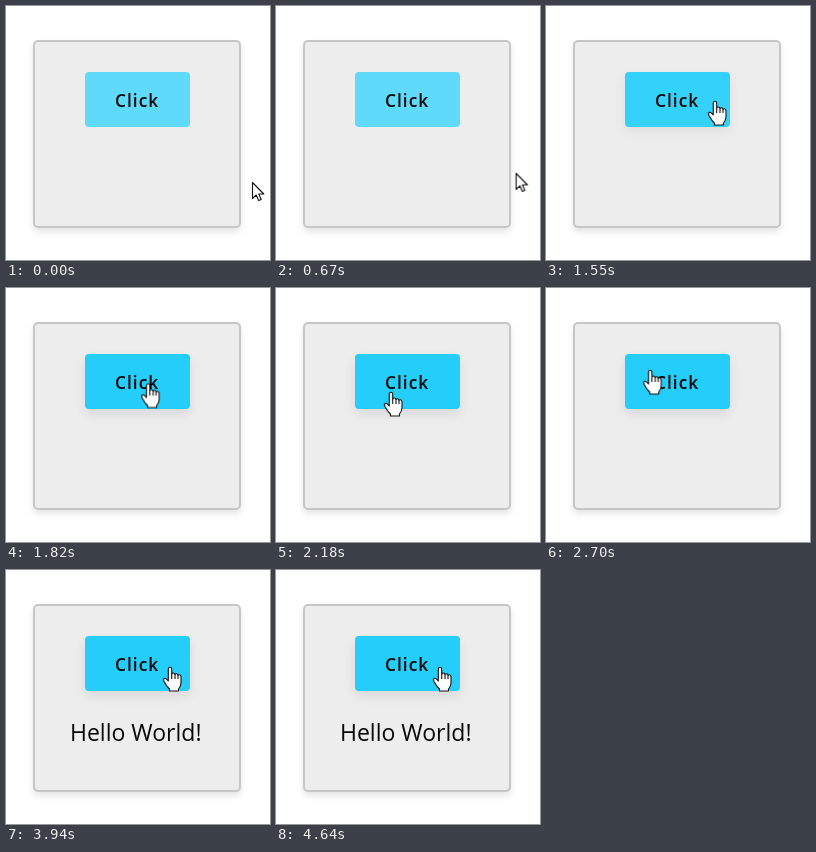
These frames come from a looping animation (264 px wide and 254 px high, 6240 ms). An HTML page:

```html
<!DOCTYPE html>
<html lang="en">
<head>
<meta charset="utf-8">
<title>Click button</title>
<style>
  :root { --loop: 6240ms; }
  html, body { margin: 0; width: 100%; height: 100%; overflow: hidden; background: #fff; }
  .stage { position: relative; width: 264px; height: 254px; overflow: hidden; }
  .stage > * { position: absolute; }

  .card {
    left: 27px; top: 34px; width: 208px; height: 188px; box-sizing: border-box;
    background: #ededed; border: 2px solid #c6c6c6; border-radius: 5px;
    box-shadow: 0 4px 6px rgba(0, 0, 0, .1);
  }
  .button {
    left: 79px; top: 66px; width: 105px; height: 55px; border-radius: 4px;
    background: #5fdafb;
    animation: hover var(--loop) infinite;
  }
  svg { left: 0; top: 0; overflow: visible; }
  text { font-family: "Open Sans", "Noto Sans", sans-serif; fill: #080808; }
  .label { font-size: 17.4px; font-weight: 600; letter-spacing: 1px; }
  .hello { font-size: 23px; animation: reveal var(--loop) step-end infinite; }

  .cursor { animation: move var(--loop) linear infinite; }
  .cursor path { fill: #fff; stroke: #111; stroke-width: 1.1; stroke-linejoin: round; }
  .arrow { animation: arrow var(--loop) step-end infinite; }
  .hand { animation: hand var(--loop) step-end infinite; }

  @keyframes hover {
    0%, 22.44% {
      background: #5fdafb; box-shadow: 0 5px 12px rgba(0, 0, 0, 0);
      animation-timing-function: ease;
    }
    28%, 100% { background: #24cdfa; box-shadow: 0 5px 12px rgba(0, 0, 0, .09); }
  }
  @keyframes reveal { 0% { opacity: 0; } 60.1%, 100% { opacity: 1; } }
  @keyframes arrow { 0% { opacity: 1; } 22.44%, 100% { opacity: 0; } }
  @keyframes hand { 0% { opacity: 0; } 22.44%, 100% { opacity: 1; } }
  @keyframes move {
    0%, 5.77% { transform: translate(246px, 176px); }
    11.22% { transform: translate(239px, 166px); }
    15.54% { transform: translate(228px, 153px); }
    17.47% { transform: translate(216px, 143px); }
    20.99% { transform: translate(193px, 120px); }
    24.84% { transform: translate(169px, 95px); }
    28.85% { transform: translate(144px, 95px); }
    32.05% { transform: translate(126px, 100px); }
    34.94% { transform: translate(115px, 104px); }
    38.14% { transform: translate(94px, 95px); }
    40.38% { transform: translate(90px, 80px); }
    43.27% { transform: translate(104px, 82px); }
    46.15% { transform: translate(146px, 93px); }
    49.68% { transform: translate(160px, 97px); }
    52.88%, 100% { transform: translate(164px, 97px); }
  }
</style>
</head>
<body>
<div class="stage">
  <div class="card"></div>
  <div class="button"></div>
  <svg width="264" height="254">
    <text class="label" x="109" y="101">Click</text>
    <text class="hello" x="64" y="171">Hello World!</text>
    <g class="cursor">
      <path class="arrow" d="M.5 .5V16.5L4.2 13L6.7 18.6L9.2 17.5L6.8 12H11.8Z"/>
      <g class="hand">
        <path d="M-1.7 14V2Q-1.7 .3 0 .3T1.7 2V7Q2 6 3.3 6T5 7.5Q5.2 6.8 6.5 6.8T8 8.5Q8.3 7.8 9.3 7.8T11 9.5V16Q11 19 8.5 22V24H-.5V22Q-3 20 -6 14.5Q-7 12 -5.5 11.3Q-4 10.8 -1.7 14Z"/>
        <path d="M1.7 7V12M5 7.5V12M8 8.5V12"/>
      </g>
    </g>
  </svg>
</div>
</body>
</html>
```
